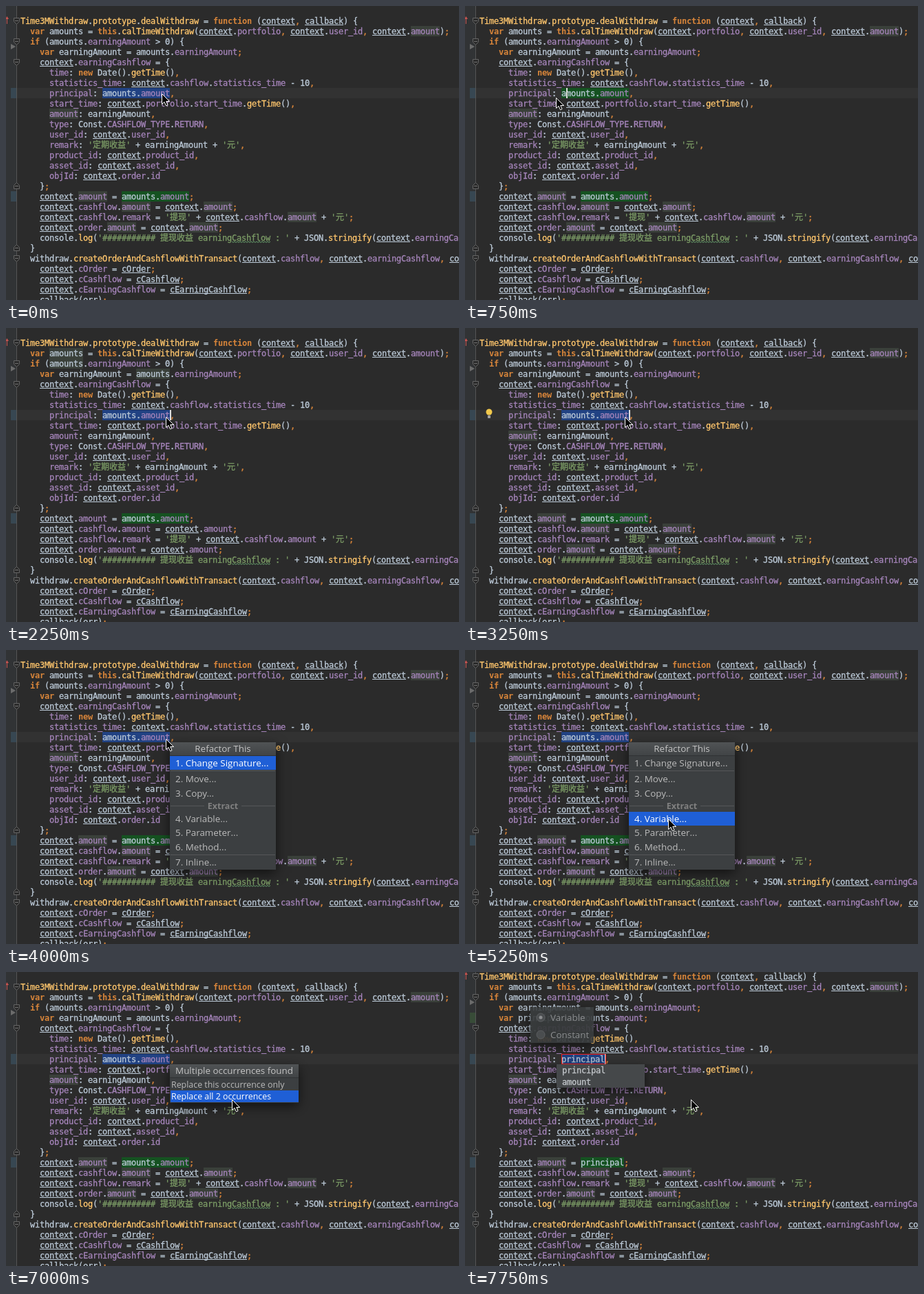
Recreate the animation shown at these times as an HTML page with a canvas. Size 658 by 427 pixels, loop 8000 ms.

```html
<!DOCTYPE html>
<html>
<head>
<meta charset="utf-8">
<style>
html, body { margin: 0; width: 100%; height: 100%; overflow: hidden; background: #2b2b2b }
canvas { display: block }
</style>
</head>
<body>
<canvas id="stage" width="658" height="427"></canvas>
<script>
const ctx = document.getElementById('stage').getContext('2d');
const LOOP = 8000, LINE = 15, BASELINE = 12, CHAR = 7, LEFT = 21;
const MONO = '"DejaVu Sans Mono", "Noto Sans CJK SC", "Noto Sans CJK", monospace';
const UI = '"Open Sans", "Noto Sans", sans-serif';
const COLOR = {
  text: '#bccad8', keyword: '#d8853a', func: '#ffc66d', field: '#a685bb',
  string: '#7c9c66', usage: '#3a403a', found: '#155221',
  selection: '#214283', active: '#1f5fd6'
};

const before = `Time3MWithdraw.prototype.dealWithdraw = function (context, callback) {
  var amounts = this.calTimeWithdraw(context.portfolio, context.user_id, context.amount);
  if (amounts.earningAmount > 0) {
    var earningAmount = amounts.earningAmount;
    context.earningCashflow = {
      time: new Date().getTime(),
      statistics_time: context.cashflow.statistics_time - 10,
      principal: amounts.amount,
      start_time: context.portfolio.start_time.getTime(),
      amount: earningAmount,
      type: Const.CASHFLOW_TYPE.RETURN,
      user_id: context.user_id,
      remark: '定期收益' + earningAmount + '元',
      product_id: context.product_id,
      asset_id: context.asset_id,
      objId: context.order.id
    };
    context.amount = amounts.amount;
    context.cashflow.amount = context.amount;
    context.cashflow.remark = '提现' + context.cashflow.amount + '元';
    context.order.amount = context.amount;
    console.log('########### 提现收益 earningCashflow : ' + JSON.stringify(context.earningCashflow));
  }
  withdraw.createOrderAndCashflowWithTransact(context.cashflow, context.earningCashflow, context.order, function (err) {
    context.cOrder = cOrder;
    context.cCashflow = cCashflow;
    context.cEarningCashflow = cEarningCashflow;
    callback(err);`.split('\n');
const after = before.map(line => line.replace('amounts.amount', 'principal'));
after.splice(4, 0, '    var principal = amounts.amount;');

// [time, x, y] of the pointer tip
const pointer = [
  [0, 226, 127], [250, 155, 130], [500, 144, 129], [750, 132, 133], [1250, 136, 130],
  [1500, 203, 129], [1750, 224, 128], [2000, 230, 127], [2250, 232, 129],
  [4500, 262, 192], [4750, 290, 223], [5000, 294, 244], [5250, 295, 245],
  [6500, 323, 205], [6750, 327, 191], [7000, 328, 185]
];
const selectionEnd = [[0, 238], [500, 140], [1500, 196], [1750, 224], [2000, 238]];
const caretAt = [[0, 0], [500, 147], [1250, 140], [1500, 196], [1750, 224], [2000, 238], [3500, 0]];

const latest = (steps, t) => steps.filter(s => s[0] <= t).pop();

function rect(x, y, w, h, color) {
  ctx.fillStyle = color;
  ctx.fillRect(x, y, w, h);
}

function poly(points, fill, stroke) {
  ctx.beginPath();
  points.forEach(p => ctx.lineTo(p[0], p[1]));
  ctx.closePath();
  if (fill) { ctx.fillStyle = fill; ctx.fill(); }
  if (stroke) { ctx.strokeStyle = stroke; ctx.lineWidth = 1; ctx.stroke(); }
}

const advance = ch => ch > '\u00ff' ? 12 : CHAR;
const codeWidth = s => [...s].reduce((w, ch) => w + advance(ch), 0);

// a hairline stroke gives the heavier look of smoothed type
function code(s, x, y, color, bold) {
  ctx.font = (bold ? 'bold ' : '') + '12px ' + MONO;
  ctx.textAlign = 'left';
  ctx.fillStyle = ctx.strokeStyle = color;
  ctx.lineWidth = 0.3;
  for (const ch of s) {
    ctx.fillText(ch, x, y);
    if (!bold) ctx.strokeText(ch, x, y);
    x += advance(ch);
  }
}

function label(s, x, y, color = '#bbbbbb', size = 13.4, align = 'left', weight = '') {
  ctx.font = `${weight} ${size}px ${UI}`;
  ctx.textAlign = align;
  ctx.fillStyle = color;
  ctx.fillText(s, x, y);
}

function tokenColor(word, prev, next) {
  if (/^'/.test(word)) return COLOR.string;
  if (/^(var|if|new|this|function)$|^[,;]$/.test(word)) return COLOR.keyword;
  if (/^(Time3MWithdraw|prototype|dealWithdraw)$/.test(word)) return COLOR.func;
  if (prev === '.') return next === '(' ? COLOR.func : COLOR.field;
  return next === ':' ? COLOR.field : COLOR.text;
}

function drawLine(line, top, usage) {
  const inFound = /(principal:|context.amount =) amounts/.test(line);
  let x = LEFT;
  for (const m of line.matchAll(/'[^']*'|\w+|[,;]|[^\w',;]+/g)) {
    const word = m[0], prev = line[m.index - 1], next = line[m.index + word.length];
    const w = codeWidth(word), color = tokenColor(word, prev, next);
    const ofAmounts = line.slice(0, m.index).endsWith('amounts.');
    if (word === usage && !ofAmounts && !(word === 'amounts' && inFound)) rect(x, top, w, LINE, COLOR.usage);
    code(word, x, top + BASELINE, color, /^[a-z]/.test(word) && color === COLOR.keyword);
    const captured = /^(context|callback|c(Order|Cashflow|EarningCashflow))$/.test(word);
    if (captured && prev !== '.') rect(x, top + BASELINE + 1, w, 1, color);
    x += w;
  }
}

function drawFold(line, top) {
  const opens = /{$/.test(line), closes = /^ *}/.test(line);
  if (!opens && !closes) return;
  const y = top + 7.5, d = opens ? 1 : -1;
  poly([[11.5, y - 4 * d], [19.5, y - 4 * d], [19.5, y + d], [15.5, y + 5 * d], [11.5, y + d]], '#2b2b2b', '#646464');
  rect(13, Math.floor(y), 5, 1, '#707070');
}

function drawEditor(t, done) {
  const lines = done ? after : before, origin = done ? -1 : 14;
  const usage = t >= 1000 && t < 2750 ? 'amounts' : 'amount';
  rect(0, 0, 658, 427, '#2b2b2b');
  rect(0, 0, 15, 427, '#313335');
  rect(15, 119, 643, LINE, '#323232');
  rect(15, 0, 1, 427, '#555555');

  const foundWidth = done ? 63 : 98;
  rect(168, 269, foundWidth, LINE, COLOR.found);
  rect(140, 119, foundWidth, LINE, COLOR.found);
  rect(140, 119, done ? 63 : latest(selectionEnd, t)[1] - 140, LINE, COLOR.selection);

  lines.forEach((line, i) => {
    const top = origin + i * LINE;
    if (/principal:|context.amount = /.test(line)) rect(7, top, 8, LINE, '#374752');
    if (/var principal/.test(line)) rect(7, top, 8, LINE, '#384c38');
    drawLine(line, top, usage);
    drawFold(line, top);
  });

  // spelling wave
  ctx.beginPath();
  for (let x = 328; x <= 384; x += 2) ctx.lineTo(x, x % 4 ? 343.5 : 342);
  ctx.strokeStyle = '#659c6b';
  ctx.lineWidth = 1;
  ctx.stroke();

  // gutter marks
  rect(1, origin + 4, 1, 8, '#c75450');
  poly([[-1, origin + 5], [1.5, origin + 1], [4, origin + 5]], '#c75450');
  poly([[7, origin + 41], [14, origin + 45], [7, origin + 49]], '#6c6c6c');

  const caret = done ? 0 : latest(caretAt, t)[1];
  if (caret) rect(caret, 119, 2, LINE, '#dddddd');
  if (t >= 3250 && t < 4000) {
    ctx.beginPath();
    ctx.arc(35, 122, 4.5, 0, 7);
    ctx.fillStyle = '#f2c94c';
    ctx.fill();
    rect(33, 127, 4, 4, '#a0a0a0');
  }
}

function popup(x, y, w, h, color = '#3c3f41') {
  ctx.save();
  ctx.shadowColor = 'rgba(0,0,0,.6)';
  ctx.shadowBlur = 16;
  ctx.shadowOffsetY = 5;
  rect(x, y, w, h, color);
  ctx.restore();
}

function titledPopup(title, w, h) {
  popup(238, 134, w, h);
  const shade = ctx.createLinearGradient(0, 134, 0, 153);
  shade.addColorStop(0, '#505355');
  shade.addColorStop(1, '#414446');
  rect(238, 134, w, 19, shade);
  rect(238, 153, w, 1, '#303234');
  label(title, 238 + w / 2, 148, '#c4c4c4', 13.4, 'center');
}

function drawMenu(t) {
  titledPopup('Refactor This', 154, 185);
  const active = t < 4500 ? 0 : t < 4750 ? 1 : 3;
  const items = [['Change Signature', 154], ['Move', 177], ['Copy', 198], ['Variable', 235],
    ['Parameter', 255], ['Method', 276], ['Inline', 298]];
  for (const y of [175, 226, 297]) rect(239, y, 152, 1, '#555759');
  rect(288, 220, 54, 13, '#3c3f41');
  label('Extract', 315, 231, '#808080', 12.5, 'center', 'bold');
  items.forEach(([name, y], i) => {
    if (i === active) rect(238, y, 154, 20, COLOR.active);
    label(`${i + 1}. ${name}...`, 246, y + 15, i === active ? '#ffffff' : undefined);
  });
}

function drawChoice(t) {
  titledPopup('Multiple occurrences found', 187, 56);
  const active = t < 7000 ? 0 : 1;
  ['Replace this occurrence only', 'Replace all 2 occurrences'].forEach((name, i) => {
    const y = 155 + i * 17;
    if (i === active) rect(239, y, 186, 17, COLOR.active);
    label(name, 240, y + 13, i === active ? '#ffffff' : undefined, 12.4);
  });
}

function drawRename() {
  ctx.strokeStyle = '#ff2020';
  ctx.lineWidth = 1;
  ctx.strokeRect(140.5, 119.5, 64, 14);
  rect(203, 119, 1, LINE, '#dddddd');

  popup(95, 51, 92, 52, 'rgba(60,63,65,.86)');
  ['Variable', 'Constant'].forEach((name, i) => {
    const y = 66 + i * 25;
    ctx.beginPath();
    ctx.arc(110, y, 6, 0, 7);
    ctx.fillStyle = '#4a4d4f';
    ctx.fill();
    ctx.strokeStyle = '#5c5e60';
    ctx.stroke();
    if (!i) {
      ctx.beginPath();
      ctx.arc(110, y, 2.5, 0, 7);
      ctx.fillStyle = '#8c8e90';
      ctx.fill();
    }
    label(name, 124, y + 5, '#8c8e90');
  });

  popup(133, 134, 128, 34, '#45484a');
  code('principal', 141, 147, '#c3c7cb');
  code('amount', 141, 164, '#c3c7cb');
}

function drawPointer(t) {
  const [, x, y] = latest(pointer, t);
  const shape = [[0, 0], [0, 15], [3.5, 11.8], [6, 17.3], [8.5, 16.2], [6.2, 11], [11, 11]];
  poly(shape.map(p => [x + p[0] + .5, y + p[1] + .5]), '#000000', '#ffffff');
}

const start = performance.now();

function frame() {
  const elapsed = performance.now() - start;
  const t = Math.floor(elapsed % LOOP / 250) * 250;
  const done = t >= 7750;
  drawEditor(t, done);
  if (t >= 4000 && t < 6000) drawMenu(t);
  if (t >= 6000 && t < 7500) drawChoice(t);
  if (done) drawRename();
  drawPointer(t);
  requestAnimationFrame(frame);
}
frame();
</script>
</body>
</html>
```
